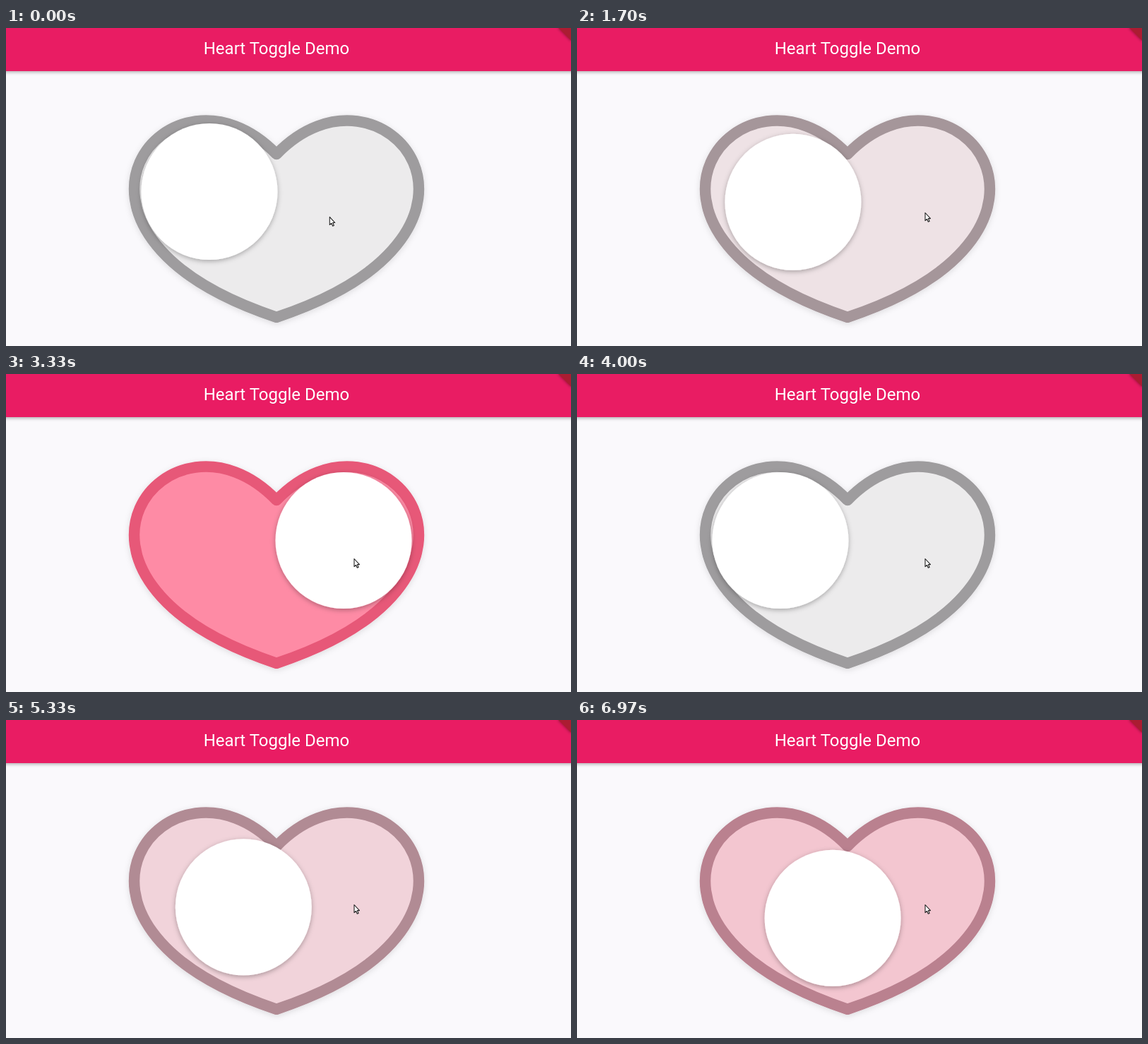
Recreate the animation shown at these times as an HTML page. Size 800 by 450 pixels, loop 7 s.

```html
<!DOCTYPE html>
<html lang="en">
<head>
<meta charset="utf-8">
<title>Heart Toggle Demo</title>
<style>
  html, body { margin: 0; width: 100%; height: 100%; overflow: hidden; background: #faf9fc; }
  svg { display: block; width: 800px; height: 450px; }
  text { font: 400 24px Roboto, sans-serif; fill: #fff; }
</style>
</head>
<body>
<svg viewBox="0 0 800 450">
  <defs>
    <filter id="barShadow" filterUnits="userSpaceOnUse" x="-20" y="-20" width="840" height="110">
      <feDropShadow dx="0" dy="2" stdDeviation="2" flood-opacity=".28"/>
    </filter>
    <filter id="heartShadow" x="-10%" y="-10%" width="120%" height="120%">
      <feDropShadow dx="0" dy="2" stdDeviation="4" flood-opacity=".12"/>
    </filter>
    <filter id="knobShadow" x="-15%" y="-15%" width="130%" height="130%">
      <feDropShadow dx="0" dy="2" stdDeviation="3.5" flood-opacity=".3"/>
    </filter>
    <filter id="ribbonShadow" filterUnits="userSpaceOnUse" x="760" y="-20" width="60" height="60">
      <feDropShadow dx="0" dy="0" stdDeviation="2" flood-opacity=".45"/>
    </filter>
  </defs>
  <rect width="800" height="450" fill="#faf9fc"/>
  <rect x="-10" y="-10" width="820" height="71" fill="#e91e63" filter="url(#barShadow)"/>
  <text x="383" y="36.5" text-anchor="middle">Heart Toggle Demo</text>
  <path d="M781 -1H801V19Z" fill="#ab1a33" filter="url(#ribbonShadow)"/>
  <path id="heart" stroke-width="15.5" stroke-linejoin="round" filter="url(#heartShadow)"
        d="M383 178.5C233.5 23.5 16.4 287.1 383 409.3C749.6 287.1 532.5 23.5 383 178.5Z"/>
  <circle id="knob" r="96.5" fill="#fff" filter="url(#knobShadow)"/>
  <path id="cursor" d="M.5 .5V11.6L3 9.3L4.8 13.3L6.6 12.5L4.9 8.6H8Z"
        fill="#fff" stroke="#222" stroke-width="1.1" stroke-linejoin="round"/>
</svg>
<script>
const LOOP = 7000, DURATION = 500;
const LEFT = 288, RIGHT = 478, REST_Y = 235.5, START_Y = 231.5, LOW_Y = 293;
const GREY = { fill: [236, 235, 236], line: [158, 156, 158] };
const PINK = { fill: [254, 139, 165], line: [231, 88, 120] };

// [tap, start of motion]; taps alternate between on and off
const taps = [[760, 788], [1520, 1500], [2450, 2500], [3330, 3342],
              [4240, 4312], [5060, 5174], [6030, 6105], [6820, 6829]];

const [heart, knob, cursor] = ['heart', 'knob', 'cursor'].map(id => document.getElementById(id));
const clamp = v => Math.min(1, Math.max(0, v));
const mix = (a, b, k) => a + (b - a) * k;
const mixColor = (a, b, k) => `rgb(${a.map((v, i) => Math.round(mix(v, b[i], k)))})`;

function bounceOut(t) {
  const k = 7.5625;
  if (t < 1 / 2.75) return k * t * t;
  if (t < 2 / 2.75) return k * (t - 1.5 / 2.75) ** 2 + 0.75;
  if (t < 2.5 / 2.75) return k * (t - 2.25 / 2.75) ** 2 + 0.9375;
  return k * (t - 2.625 / 2.75) ** 2 + 0.984375;
}

function toggleAt(time) {
  const index = taps.findLastIndex(([tap]) => time >= tap);
  if (index < 0) return { value: 0, leftY: START_Y };
  const progress = bounceOut(clamp((time - taps[index][1]) / DURATION));
  const turningOn = index % 2 === 0;
  return turningOn ? { value: progress, leftY: START_Y }
                   : { value: 1 - progress, leftY: REST_Y };
}

function render(time) {
  const { value, leftY } = toggleAt(time);
  const y = value < 0.5 ? mix(leftY, LOW_Y, value * 2) : mix(LOW_Y, REST_Y, value * 2 - 1);
  knob.setAttribute('cx', mix(LEFT, RIGHT, value));
  knob.setAttribute('cy', y);
  heart.setAttribute('fill', mixColor(GREY.fill, PINK.fill, value));
  heart.setAttribute('stroke', mixColor(GREY.line, PINK.line, value));
  const move = clamp(time / 120);
  cursor.setAttribute('transform', `translate(${mix(457.5, 492.5, move)} ${mix(267, 261, move)})`);
}

const origin = performance.now();
function tick() {
  render((performance.now() - origin) % LOOP);
  requestAnimationFrame(tick);
}
render(0);
requestAnimationFrame(tick);
</script>
</body>
</html>
```
